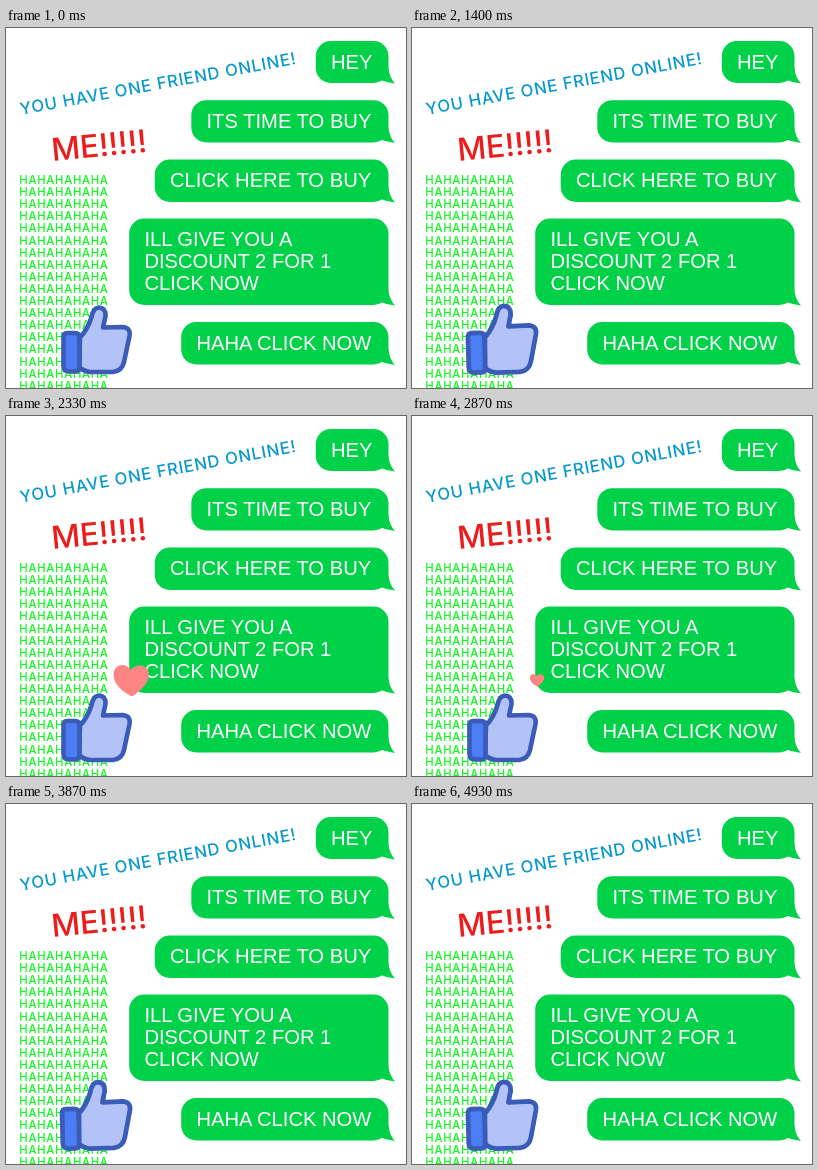
These frames come from a looping animation (400 px wide and 360 px high, 5 s). An HTML page:

```html
<!DOCTYPE html>
<html lang="en">
<head>
<meta charset="utf-8">
<title>One friend online</title>
<style>
html, body { margin: 0; width: 100%; height: 100%; overflow: hidden; background: #fff; }
svg { display: block; width: 400px; height: 360px; }
.fun { font-family: Inter, "Open Sans", sans-serif; font-weight: 500; letter-spacing: .045em; }
#chat { font: 20.2px "Liberation Sans", Arial, sans-serif; }
#thumb { stroke: #3b5bb8; stroke-width: 4.6; stroke-linejoin: round; }
</style>
</head>
<body>
<svg viewBox="0 0 400 360">
  <g class="fun">
    <text transform="translate(15 87) rotate(-10.5)" font-size="16.7" fill="#0799cb">YOU HAVE ONE FRIEND ONLINE!</text>
    <text transform="translate(46.500 133) rotate(-5.5)" font-size="31.5" letter-spacing="0" fill="#ec1c1c">ME!!!!!</text>
    <g id="laugh" font-size="11.3" fill="#12f820"></g>
  </g>
  <g id="chat"></g>
  <path id="heart" fill="#ff8585" d="M1.500 16Q0 16.500-2 15C-9 11-17.500 4-17.500-5.500C-17.500-11-13.500-15-9-15C-5-15-2-13-.5-10C2-13 5-14.500 9-14.500C14-14.500 18-11 18-5.500C18 4 8 11 4 14.500Z"/>
  <g id="thumb">
    <path fill="#b3c3f8" d="M74 309.500Q82 301 85.500 289Q87.500 279.500 93 279.500Q100 280 99.500 288L97 299.500L117 299Q125 300 123.500 308L118 334Q116 343 107 344L84 344Q77 343 73 339Z"/>
    <path fill="#4b7df5" d="M61 305H69Q73.500 305 73.500 309.500V339Q73.500 343.500 69 343.500H63Q57.500 343.500 57.500 338V309.500Q57.500 305 61 305Z"/>
  </g>
</svg>
<script>
const $ = id => document.getElementById(id);

let rows = "";
for (let i = 0; i < 18; i++) rows += `<text x="13.3" y="${156 + i * 12.1}">HAHAHAHAHA</text>`;
$("laugh").innerHTML = rows;

// Each bubble: left, top, bottom, lines of text
const bubbles = [
  [309.8, 13, 55, "HEY"],
  [185.3, 72.2, 114.5, "ITS TIME TO BUY"],
  [148.8, 131.6, 174, "CLICK HERE TO BUY"],
  [123.2, 190.6, 277, "ILL GIVE YOU A", "DISCOUNT 2 FOR 1", "CLICK NOW"],
  [175.2, 294, 336.4, "HAHA CLICK NOW"]
];
$("chat").innerHTML = bubbles.map(([x, top, bottom, ...lines]) =>
  `<g fill="#00d149"><rect x="${x}" y="${top}" width="${382.5 - x}" height="${bottom - top}" rx="15"/>
  <path d="M382.5 ${bottom - 15}Q383 ${bottom - 6} 389 ${bottom + .5}Q380 ${bottom - .5} 372 ${bottom - 4}Z"/></g>` +
  lines.map((s, i) => `<text x="${x + 15.2}" y="${top + 27.7 + i * 22}" fill="#fff">${s}</text>`).join("")
).join("");

const ease = (t, a, b) => {
  const p = Math.min(1, Math.max(0, (t - a) / (b - a)));
  return p * p * (3 - 2 * p);
};

function draw(now) {
  // 15 steps a second; the sticker repeats every 18 steps
  const step = Math.floor((now % 5000) * .015 + .05);
  const t = step % 18 / 15;
  const swing = ease(t, 0, .12) - ease(t, .24, .42);
  $("thumb").setAttribute("transform",
    `translate(90 330) rotate(${-1.5 * swing}) scale(${1 + .03 * swing}) translate(-90 -330)`);
  const pop = ease(t, .38, .58);
  $("heart").setAttribute("transform", `translate(125 264) scale(${pop})`);
  requestAnimationFrame(draw);
}
draw(performance.now());
</script>
</body>
</html>
```
